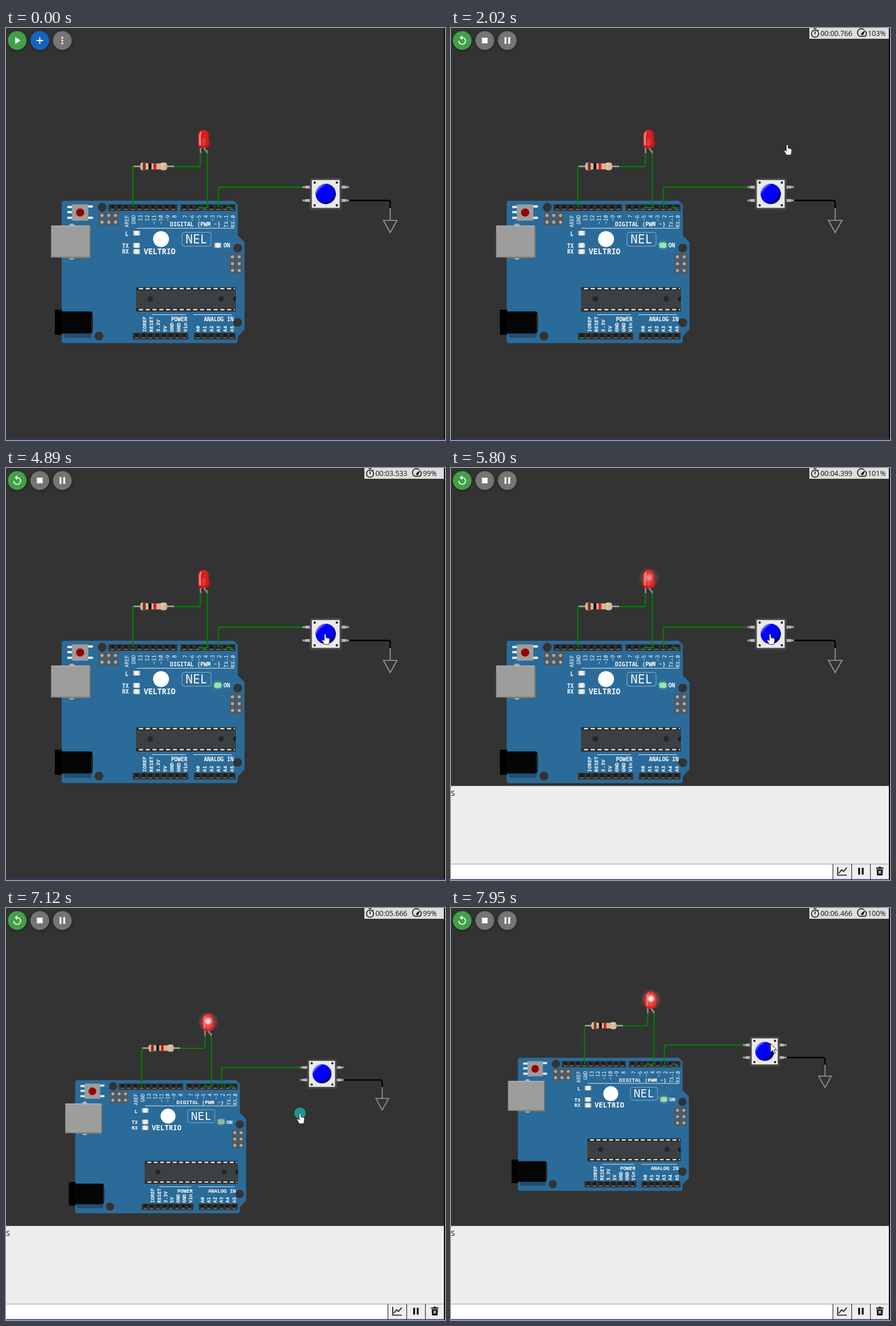
Animation of 773x725 px, one loop 8 s. Source, as an HTML page:

```html
<!DOCTYPE html>
<html lang="en">
<head>
<meta charset="utf-8">
<title>Circuit simulator</title>
<style>
  html, body { margin: 0; width: 100%; height: 100%; overflow: hidden; background: #333; }
  svg { display: block; width: 100%; height: 100%; }
  text { white-space: pre; }
  .mono { font-family: "Noto Sans Mono", "DejaVu Sans Mono", monospace; fill: #fff; }
  .ui { font: 12.4px "Open Sans", "Noto Sans", sans-serif; fill: #111; }
</style>
</head>
<body>
<svg id="stage" viewBox="0 0 773 725">
  <defs>
    <radialGradient id="redGlow">
      <stop offset="0" stop-color="#ff8080" stop-opacity=".85"/>
      <stop offset=".4" stop-color="#ff6060" stop-opacity=".6"/>
      <stop offset="1" stop-color="#ff4040" stop-opacity="0"/>
    </radialGradient>
    <radialGradient id="spark">
      <stop offset="0" stop-color="#fff"/>
      <stop offset=".5" stop-color="#ffe6e0" stop-opacity=".8"/>
      <stop offset="1" stop-color="#ffc0c0" stop-opacity="0"/>
    </radialGradient>
    <linearGradient id="ledBody">
      <stop offset="0" stop-color="#c01818"/><stop offset=".55" stop-color="#d92222"/><stop offset="1" stop-color="#c81414"/>
    </linearGradient>
    <linearGradient id="knob" x2="1" y2="1">
      <stop offset="0" stop-color="#fff"/><stop offset=".3" stop-color="#00f"/>
      <stop offset=".5" stop-color="#00f"/><stop offset="1"/>
    </linearGradient>
    <filter id="soft" x="-60%" y="-60%" width="220%" height="220%"><feGaussianBlur stdDeviation="2"/></filter>
  </defs>
  <g id="scene"></g>
  <g id="panel"></g>
  <g id="idle"></g>
  <g id="running"></g>
  <path d="M772 0V725" stroke="#0a0a0a" stroke-width="2"/>
  <path d="M0 724.3H773" stroke="#3d2f80" stroke-width="1.4"/>
  <g id="cursor">
    <circle id="press" r="10" fill="#1f9494"/>
    <path id="hand" d="M-1.5 1.5Q0-1.2 1.5 1.5V6.5L6.5 7.6Q8.3 8.2 8 11L6.6 18.6H-1.2L-5.3 11.8Q-5.6 9.6-3.2 10.2L-1.5 12Z" fill="#fff" stroke="#222" stroke-width=".9"/>
    <path id="arrow" d="M0 0V15.5L3.6 12.3L6 17.6L8.4 16.5L6 11.4H10.8Z" fill="#fff" stroke="#111" stroke-width=".9"/>
  </g>
</svg>
<script>
const $ = id => document.getElementById(id);
const range = (n, f) => Array.from({ length: n }, (_, i) => f(i)).join('');
const rect = (x, y, w, h, fill, rx = 0, extra = '') =>
  `<rect x="${x}" y="${y}" width="${w}" height="${h}" fill="${fill}" rx="${rx}" ${extra}/>`;
const disc = (x, y, r, fill, extra = '') => `<circle cx="${x}" cy="${y}" r="${r}" fill="${fill}" ${extra}/>`;
const line = (d, color, width, extra = '') =>
  `<path d="${d}" fill="none" stroke="${color}" stroke-width="${width}" ${extra}/>`;
const shape = (d, fill, extra = '') => `<path d="${d}" fill="${fill}" ${extra}/>`;
const label = (x, y, str, size = 9.7, weight = 600, extra = '') =>
  `<text class="mono" x="${x}" y="${y}" font-size="${size}" font-weight="${weight}" ${extra}>${str}</text>`;

// Distance between neighbouring pins.
const PITCH = 11.94;
const upright = (names, x, y, weight, anchor) => names.split(' ').map((name, i) =>
  `<g transform="translate(${x + i * PITCH + 3.4} ${y}) rotate(-90)">${label(0, 0, name, 9.2, weight, `text-anchor="${anchor}"`)}</g>`).join('');

// A socket strip; x and y are its top left corner.
const header = (x, y, pins) => rect(x, y, pins * PITCH + 1.8, PITCH, '#333') + range(pins, i => {
  const left = x + 3 + i * PITCH, top = y + 2.2;
  return rect(left, top, 7.7, 7.7, '#262626') + rect(left + 2, top + 2, 3.7, 3.7, '#191919') +
    shape(`M${left} ${top}h7.7l-2 2h-3.7z`, '#151515') + shape(`M${left} ${top + 7.7}h7.7l-2-2h-3.7z`, '#707070');
});

const icsp = (x, y, cols, rows) => range(cols * rows, i => {
  const px = x + (i % cols) * PITCH, py = y + Math.floor(i / cols) * PITCH;
  return rect(px - 5.4, py - 5.4, 10.8, 10.8, '#565656') + disc(px, py, 2.8, '#aaa');
});

const smallLed = (x, y) => rect(x - 6, y - 4, 12, 8, '#c6c6c6') + rect(x - 3.5, y - 4.2, 7, 8.4, '#f0f0f0');

function board() {
  const holes = [[169.5, 315.6], [408, 387.3], [408, 518.3], [163.6, 542]];
  return shape('M102.5 304H401.2L408.2 311V365L420 377V530.6L408.2 542.4V550Q408.2 554.5 403.7 554.5H102.5Q98 554.5 98 550V308.5Q98 304 102.5 304Z', '#2b6b99') +
    holes.map(([x, y]) => disc(x, y, 7.8, '#333')).join('') +
    [315, 324, 334].map(y => rect(108, y - 2, 9, 4, '#e8e8e8')).join('') +
    [314, 334].map(y => rect(145, y - 2, 8, 4, '#e8e8e8')).join('') +
    rect(116, 310.5, 29, 28.5, '#9d9d9d', 1) + disc(130.5, 324.7, 7.2, '#960000') +
    `<ellipse cx="116" cy="349" rx="5.3" ry="4.8" fill="#b3b2b2"/><ellipse cx="116" cy="403" rx="5.3" ry="4.8" fill="#b3b2b2"/>` +
    rect(98, 349.5, 51, 55.5, '#706f6f') + rect(79.4, 347.8, 68, 55.8, '#9d9d9c') +
    rect(79.4, 347.8, 68, 1.3, '#b8b8b8') + rect(79.4, 402, 68, 1.6, '#868686') +
    rect(101, 503, 50, 42, '#1f4e72', 4) +
    rect(86, 495.7, 13, 44.3, '#000', 2) + rect(97, 498.7, 55, 38.8, '#050505', 4) + rect(150, 505, 3, 26, '#222', 1) +
    header(180.4, 310, 10) + header(307, 310, 8) + header(223.4, 536.3, 8) + header(330.9, 536.3, 6) +
    icsp(169, 329.7, 3, 2) + icsp(398.7, 402.8, 2, 3) +
    upright('AREF GND 13 12 ~11 ~10 ~9 8', 213, 329, 500, 'end') +
    upright('7 ~6 ~5 4 ~3 2 TX→1 RX←0', 316, 329, 500, 'end') +
    upright('IOREF RESET 3.3V 5V GND GND Vin', 244, 535, 700, 'start') +
    upright('A0 A1 A2 A3 A4 A5', 337.5, 535, 700, 'start') +
    label(289, 349, 'DIGITAL (PWM ~)', 9.9) + label(290.5, 515.5, 'POWER') + label(348.5, 515.5, 'ANALOG IN') +
    line('M230 352.3H402M257 504.5H317M330 504.5H398', '#e4edf3', 1) +
    label(210, 366, 'L') + label(204.5, 386.5, 'TX') + label(204.5, 397, 'RX') + label(383, 386.3, 'ON') +
    smallLed(230, 361) + smallLed(230, 382.5) + smallLed(230, 393.5) + smallLed(373, 382.3) +
    `<g id="power"><ellipse id="powerHalo" cx="373" cy="382.3" rx="7" ry="5.5" filter="url(#soft)" opacity=".75"/>` +
    rect(368.5, 378.6, 9, 7.4, '#8cf0a0', 2, 'id="powerCore"') + `</g>` +
    disc(273, 371.5, 14, '#fff') + label(242.5, 398, 'VELTRIO', 13.3, 800) +
    rect(310, 359.5, 51, 24.5, 'none', 4, 'stroke="#8fb5d0" stroke-width="1"') + label(316, 378.7, 'NEL', 21.5, 500) +
    rect(229, 456, 175.5, 43, '#292c2d', 1) + rect(229, 461.5, 175.5, 31.5, '#3c4042') +
    line('M234 458.7H403M234 495.7H403', '#f0f0f0', 2.2, 'stroke-dasharray="7.4 4.54"') +
    disc(254, 476.8, 5, '#252728') + disc(379, 476.8, 5, '#252728') + shape('M404.5 472a4.8 4.8 0 0 0 0 9.6z', '#1e2021');
}

function resistor() {
  return line('M224 243.5H296', '#aaa', 2.6) +
    shape('M236 243.5Q236 236.5 241 236.5Q246 236.5 249 238.3H271Q274 236.5 279 236.5Q284 236.5 284 243.5Q284 250.5 279 250.5Q274 250.5 271 248.7H249Q246 250.5 241 250.5Q236 250.5 236 243.5Z', '#d5b597') +
    shape('M238 240Q240 237.5 246 239L250 240H270Q279 236 282 240Z', '#ecd6bd', 'opacity=".7"') +
    rect(241, 236.8, 5, 13.4, '#7b3423') + rect(251, 238.3, 5, 10.4, '#000') + rect(259.7, 238.3, 5, 10.4, '#e01818') +
    rect(274, 237.2, 3.5, 12.6, '#e2c49b');
}

function redLed() {
  return line('M342.5 208V221M349.5 208V212Q350 215 354 217V221', '#8c8c8c', 2.8) +
    shape('M338 188.6a9.6 9.6 0 0 1 19.2 0V197.5Q359.3 199 359.2 205Q359 208.5 355.5 210Q348 212.5 340 210.5Q338 209.5 338 206Z', 'url(#ledBody)') +
    shape('M339.8 189.5Q340.2 183 345.5 181.2Q343.3 185 343.3 190V208L339.8 206Z', '#f0a6a6', 'opacity=".75"') +
    shape('M345 196L351 193V208H345Z', '#e84c4c', 'opacity=".55"') +
    line('M338.6 206Q347 211 358.5 205.5', '#a00d0d', 1) +
    `<g id="glow">${disc(348.5, 194, 20, 'url(#redGlow)')}${disc(348.5, 192.5, 8, 'url(#spark)', 'id="glowCore"')}</g>`;
}

function pushButton() {
  const corners = [[543.5, 272], [582.5, 272], [543.5, 312], [582.5, 312]];
  return line('M522 280H536M522 303.5H536M590 280H604M590 303.5H604', '#999', 3.4) +
    line('M527 280H536M527 303.5H536M590 280H599M590 303.5H599', '#b5b5b5', 5) +
    rect(535, 264, 56, 56, '#464646', 2) + rect(538.5, 267.5, 49, 49, '#eaeaea', 1) +
    corners.map(([x, y]) => disc(x, y, 2, '#111')).join('') +
    disc(563, 292, 17.9, 'url(#knob)') +
    disc(563, 292, 13.6, '#00f', 'stroke="#2f2f2f" stroke-opacity=".47" stroke-width=".4"');
}

$('scene').innerHTML = board() + resistor() + redLed() + pushButton() +
  line('M223.3 316V245Q223.3 243.5 225 243.5M296 244H339.5Q342.3 244 342.3 241V220M354.5 220V313Q354.5 316 351 316H338M374 316V283Q374 280 377 280H522M387 316H399', '#008000', 2.3) +
  line('M604 303.5H672.5Q676.5 303.5 676.5 307.5V317', '#000', 2.4) +
  line('M676.5 317V338M664.5 338.5H688.5L676.5 360Z', '#999', 1.7);

const roundButton = (x, color, icon) => disc(x, 23.5, 17, '#000', 'opacity=".35" filter="url(#soft)"') +
  disc(x, 22, 16.5, color) + `<g transform="translate(${x} 22)">${icon}</g>`;

$('idle').innerHTML = roundButton(19.7, '#43a047', shape('M-3.4-5.9L5.9 0L-3.4 5.9Z', '#fff')) +
  roundButton(59.5, '#1565c0', line('M-5.9 0H5.9M0-5.9V5.9', '#fff', 1.8)) +
  roundButton(99.2, '#757575', [-5, 0, 5].map(y => disc(0, y, 1.7, '#fff')).join(''));

const stopwatch = disc(641, 10, 6.3, 'none', 'stroke="#111" stroke-width="1.6"') +
  line('M638.5 1H643.5M641 6V11M645.6 4.6L647 3.3', '#111', 1.6);
const gauge = line('M719.5 14.5A7 7 0 1 1 727.5 3.2M730.4 5.8A7 7 0 0 1 729 14.5H719', '#111', 1.5) +
  shape('M722.5 9.2L730.5 3L726 11.6A2.1 2.1 0 0 1 722.5 9.2Z', '#111');

$('running').innerHTML =
  roundButton(19.7, '#43a047', `<g transform="scale(.84) translate(-12 -12)">${shape('M12 5V1L7 6l5 5V7c3.31 0 6 2.69 6 6s-2.69 6-6 6-6-2.69-6-6H4c0 4.42 3.58 8 8 8s8-3.58 8-8-3.58-8-8-8z', '#fff')}</g>`) +
  roundButton(59.5, '#757575', rect(-5, -5, 10, 10, '#fff')) +
  roundButton(99.2, '#757575', rect(-5, -5.9, 3.4, 11.8, '#fff') + rect(1.6, -5.9, 3.4, 11.8, '#fff')) +
  rect(631, 0, 140, 19, '#dedede') + stopwatch + gauge +
  '<text id="clock" class="ui" x="650.5" y="14"></text><text id="speed" class="ui" x="734" y="14"></text>';

$('panel').innerHTML = rect(0, 559.5, 771, 166, '#eee') + rect(0, 697, 672, 28, '#fff') +
  line('M0 697H771', '#999', 1) + line('M672.5 697V724M705.5 697V724M738.5 697V724', '#333', 1.2) +
  '<text class="ui" x="0" y="577">S</text>' +
  line('M681 702V716.5H697M683 713L688 707L691 710L697 703', '#111', 1.7) +
  rect(717, 703.5, 3.3, 12, '#111') + rect(723.3, 703.5, 3.3, 12, '#111') +
  shape('M749.5 706H760.5L759.8 717H750.2ZM748.5 703H752.5L753.5 701.5H756.5L757.5 703H761.5V705H748.5Z', '#111') +
  line('M752.8 708.5L757.2 713.5M757.2 708.5L752.8 713.5', '#eee', 1.3);

const LOOP = 8000, SIM_START = 1220, BUTTON_DOWN = 4960;

const linear = u => u, smooth = u => u * u * (3 - 2 * u);

// Keys are [time, ...values]; returns the values at time t.
function track(keys, t, ease = smooth) {
  const i = keys.findIndex(k => k[0] > t);
  if (i < 0) return keys[keys.length - 1].slice(1);
  if (i === 0) return keys[0].slice(1);
  const a = keys[i - 1], b = keys[i], u = ease((t - a[0]) / (b[0] - a[0]));
  return a.slice(1).map((v, n) => v + (b[n + 1] - v) * u);
}
const held = (keys, t) => keys.reduce((v, k) => t >= k[0] ? k[1] : v, keys[0][1]);

const pointer = [[130, 585, 563], [900, 20, 22], [1740, 20, 22], [2000, 592, 205], [2350, 592, 205],
  [2580, 578, 268], [2820, 562, 292], [6150, 562, 292], [6700, 521.5, 366.5], [6990, 521.5, 366.5],
  [7120, 517.7, 361], [7600, 513.7, 321.5], [7680, 513.7, 321.5], [7940, 562.5, 238.5]];
const view = [[6850, 1, 0, 0], [6990, .9347, 34.1, 23.9], [7120, .9347, 30.2, 18.9], [7600, .9347, 26.2, -20.6]];
const ticks = [[SIM_START, 0], [2020, 46], [3580, 135], [4890, 212], [5800, 264], [7120, 340], [7950, 388]];
const speeds = [[SIM_START, 100], [1500, 102], [1810, 103], [2400, 100], [4500, 99], [5400, 101], [6400, 99], [7750, 100]];
const glow = [[BUTTON_DOWN, 0], [5170, .5], [5800, .65], [6600, 1]];
const powerColor = [[0, '#8cf0a0'], [6990, '#86b8a0'], [7700, '#a2dca2']];
const presses = [[1000, 1150], [BUTTON_DOWN - 40, 5060], [7000, 7610]];

const show = (id, on) => $(id).setAttribute('display', on ? 'inline' : 'none');
const pad = (n, len) => String(n).padStart(len, '0');

function draw(t) {
  const running = t >= SIM_START;
  show('idle', !running);
  show('running', running);
  show('power', running);
  show('panel', t >= BUTTON_DOWN + 40);

  const [scale, tx, ty] = track(view, t);
  $('scene').setAttribute('transform', `translate(${tx} ${ty}) scale(${scale})`);

  const tick = Math.floor(track(ticks, t, linear)[0] + .001);
  const ms = Math.floor(tick * 16.66666 + .0012);
  $('clock').textContent = `00:${pad(Math.floor(ms / 1000), 2)}.${pad(ms % 1000, 3)}`;
  $('speed').textContent = held(speeds, t) + '%';

  const [brightness] = track(glow, t);
  $('glow').setAttribute('opacity', brightness);
  $('glowCore').setAttribute('opacity', brightness);
  const color = held(powerColor, t);
  $('powerCore').setAttribute('fill', color);
  $('powerHalo').setAttribute('fill', color);

  const [x, y] = track(pointer, t);
  const isArrow = t < 850 || t >= 7620;
  $('cursor').setAttribute('transform', `translate(${x} ${y})`);
  show('cursor', t >= 130);
  show('arrow', isArrow);
  show('hand', !isArrow);
  show('press', presses.some(([from, to]) => t >= from && t < to));
}

const start = performance.now();
(function frame() {
  draw((performance.now() - start) % LOOP);
  requestAnimationFrame(frame);
})();
</script>
</body>
</html>
```
